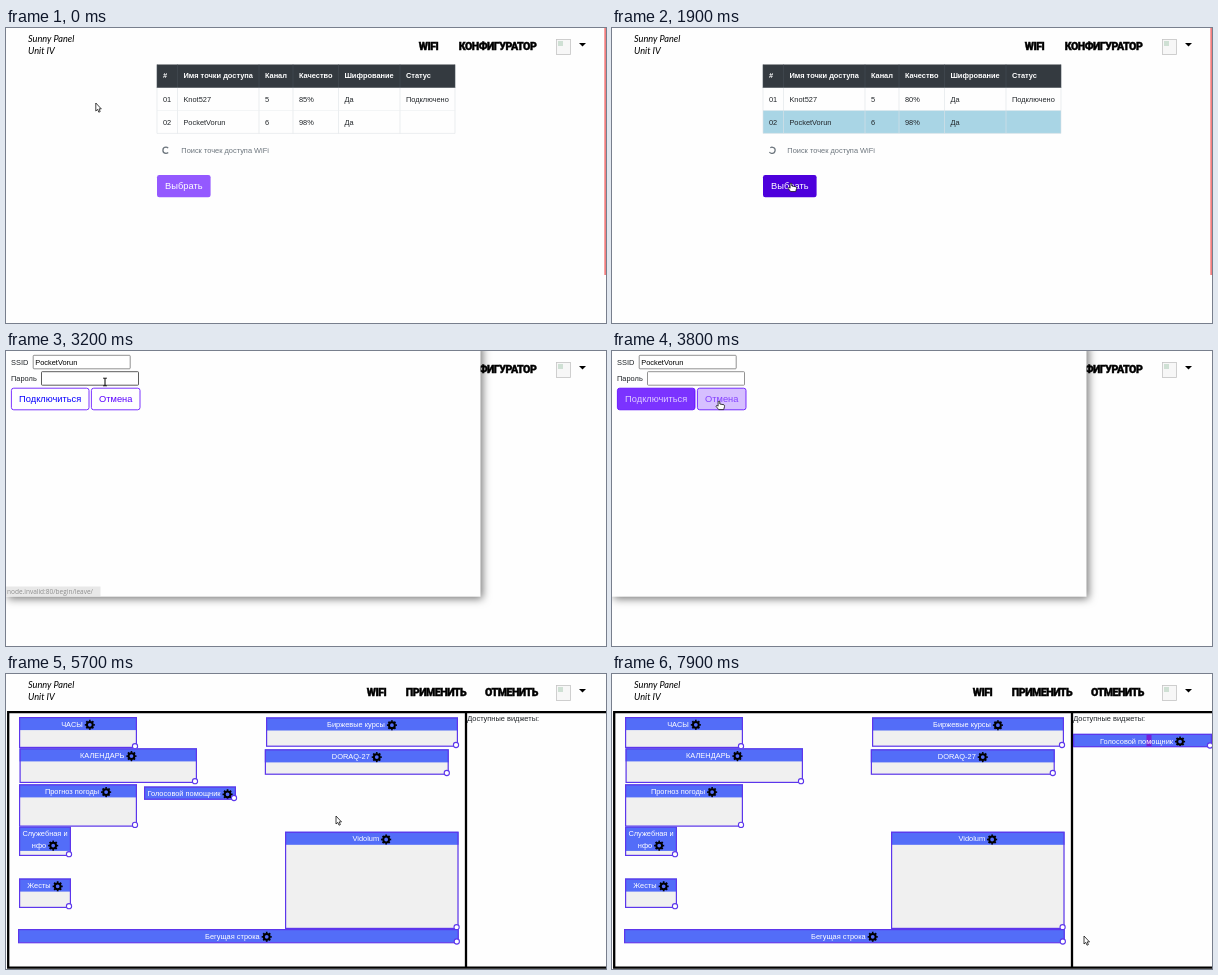
An HTML page that plays this animation: 600x295 px, repeating every 8000 ms.

```html
<!DOCTYPE html>
<html lang="ru">
<head>
<meta charset="utf-8">
<style>
  html, body { margin: 0; width: 100%; height: 100%; overflow: hidden; background: #fefefe; }
  svg { display: block; width: 600px; height: 295px; font: 7.43px "Liberation Sans", Arial, sans-serif; }
  text { fill: #212529; white-space: pre; }
  .logo { font: italic 9.2px Lato, sans-serif; fill: #000; }
  .nav { font: 900 10.6px Roboto, sans-serif; letter-spacing: -.5px; fill: #000; stroke: #000; stroke-width: .4; text-anchor: middle; }
  .nav.lit { fill: #3f8490; stroke: #3f70a0; }
  .head { font-weight: bold; fill: #fff; }
  .btn { font-size: 9.29px; text-anchor: middle; }
  .title { fill: #fff; text-anchor: middle; }
  .status { font: 6.5px "Open Sans", sans-serif; fill: #444; }
  .modal-box { fill: #fefefe; filter: drop-shadow(2px 2px 4px rgba(0,0,0,.55)); }
  .cursor { stroke: #111; stroke-width: .8; stroke-linejoin: round; fill: #fff; }
</style>
</head>
<body>
<svg id="stage" viewBox="0 0 600 295"></svg>
<script>
const LOOP = 8000, STEP = 100;
const PURPLE = '#5b00ff';
const stage = document.getElementById('stage');

function add(parent, tag, attrs = {}, content) {
  const el = document.createElementNS('http://www.w3.org/2000/svg', tag);
  for (const k in attrs) el.setAttribute(k, attrs[k]);
  if (content !== undefined) el.textContent = content;
  parent.append(el);
  return el;
}
const group = (parent, attrs) => add(parent, 'g', attrs);
const rect = (parent, x, y, width, height, fill, more) =>
  add(parent, 'rect', { x, y, width, height, fill, ...more });
const text = (parent, x, y, str, cls = '') => add(parent, 'text', { x, y, class: cls }, str);
const path = (parent, d, more) => add(parent, 'path', { d, ...more });
const show = (el, on) => { el.style.display = on ? '' : 'none'; };
const set = (el, attrs) => { for (const k in attrs) el.setAttribute(k, attrs[k]); };

// Linear interpolation through rows of [time, ...values]
function track(rows, t) {
  let i = 0;
  while (i < rows.length - 1 && rows[i + 1][0] <= t) i++;
  const a = rows[i], b = rows[i + 1] || a;
  const p = b === a ? 0 : (t - a[0]) / (b[0] - a[0]);
  return a.slice(1).map((v, k) => v + (b[k + 1] - v) * p);
}

// Shared top bar
text(stage, 22, 14, 'Sunny Panel', 'logo');
text(stage, 22, 26.3, 'Unit IV', 'logo');
rect(stage, 550.5, 11.5, 14, 15, '#f7f7f7', { stroke: '#c4c4c4', 'stroke-width': .8 });
rect(stage, 552, 13, 5, 5, '#cfe0d4');
path(stage, 'M573 15h7l-3.5 3.6z');

// Wi-Fi page
const wifi = group(stage);
text(wifi, 422.5, 21.7, 'WIFI', 'nav');
const configLink = text(wifi, 491.5, 21.7, 'КОНФИГУРАТОР', 'nav');
const redEdge = rect(wifi, 598.3, 0, 1.7, 247, '#f27e7e');

const COLS = [151, 171.5, 253, 287, 332.5, 394, 449];
const ROWS = [36.5, 60, 82.7, 105.4];
const cells = [
  ['#', 'Имя точки доступа', 'Канал', 'Качество', 'Шифрование', 'Статус'],
  ['01', 'Knot527', '5', '85%', 'Да', 'Подключено'],
  ['02', 'PocketVorun', '6', '98%', 'Да', '']
];
const rowBoxes = [], cellTexts = [];
cells.forEach((row, r) => {
  const y = ROWS[r], h = ROWS[r + 1] - y;
  rowBoxes.push(rect(wifi, 151, y, 298, h, r ? '#fefefe' : '#343a40'));
  COLS.forEach(x => path(wifi, `M${x} ${y}v${h}`, { stroke: r ? '#dee2e6' : '#454d55', 'stroke-width': .6 }));
  path(wifi, `M151 ${y + h}h298`, { stroke: '#dee2e6', 'stroke-width': .6 });
  cellTexts.push(row.map((s, c) => text(wifi, COLS[c] + 5.9, y + 13.8, s, r ? '' : 'head')));
});

const spinner = add(wifi, 'circle', {
  cx: 160, cy: 122.3, r: 3.1, fill: 'none', stroke: '#6c757d', 'stroke-width': 1.3,
  pathLength: 8, 'stroke-dasharray': '6 2', 'stroke-dashoffset': -1
});
text(wifi, 175.3, 125, 'Поиск точек доступа WiFi').style.fill = '#6c757d';
const pick = rect(wifi, 151, 147, 53.6, 22.3, PURPLE, { rx: 2.3 });
text(wifi, 177.8, 161.3, 'Выбрать', 'btn').style.fill = '#fff';

function statusBar(parent, y) {
  const g = group(parent);
  rect(g, 0, y, 94.5, 10, '#dadada');
  text(g, 1, y + 7.4, 'node.invalid:80/begin/leave/', 'status');
  return g;
}
const pageStatus = statusBar(wifi, 285);

// Connection dialog
const modal = group(stage);
rect(modal, 0, -8, 474.5, 253.7, '#fefefe', { class: 'modal-box' });
function field(label, y, x, value) {
  text(modal, 5, y + 9.5, label);
  const box = rect(modal, x, y, 97, 13.5, '#fff', { rx: .8, stroke: '#767676', 'stroke-width': .8 });
  text(modal, x + 2, y + 9.5, value).style.fill = '#000';
  return box;
}
field('SSID', 4.3, 27.2, 'PocketVorun');
const password = field('Пароль', 20.7, 35.5, '');

function outlineButton(x, w, label) {
  const box = rect(modal, x, 37.2, w, 21.6, PURPLE, { rx: 2.3, stroke: PURPLE, 'stroke-width': .8 });
  const caption = text(modal, x + w / 2, 51.2, label, 'btn');
  return level => {
    box.setAttribute('fill-opacity', level);
    const mix = c => Math.round(c + (255 - c) * level);
    caption.style.fill = `rgb(${mix(91)},${mix(0)},255)`;
  };
}
const setConnect = outlineButton(5.4, 77.6, 'Подключиться');
const setCancel = outlineButton(85.4, 48.6, 'Отмена');
const modalStatus = statusBar(modal, 235.5);

// Widget editor
const editor = group(stage);
[[370.5, 'WIFI'], [430, 'ПРИМЕНИТЬ'], [505.5, 'ОТМЕНИТЬ']].forEach(([x, s]) => text(editor, x, 21.7, s, 'nav'));
path(editor, 'M602 38.2H2.2V293.7H602M460 38.2V293.7', { fill: 'none', stroke: '#000', 'stroke-width': 2.3 });
text(editor, 461.2, 46.7, 'Доступные виджеты:');

function gear(parent, x, y) {
  const g = group(parent, { transform: `translate(${x} ${y})`, fill: 'none', stroke: '#000' });
  add(g, 'circle', { r: 2.9, 'stroke-width': 2 });
  add(g, 'circle', { r: 4.2, 'stroke-width': 1.7, pathLength: 16, 'stroke-dasharray': '1 1', 'stroke-dashoffset': .5 });
}

function widget(x, y, w, h, title, mark) {
  const g = group(editor, { transform: `translate(${x} ${y})` });
  const lines = title.split('\n');
  const head = Math.min(h, 1.8 + 11.3 * lines.length);
  rect(g, 0, 0, w, h, '#f0f0f0');
  rect(g, 0, 0, w, head, '#536df8');
  if (mark) rect(g, w / 2 + 4, 1, 5, h - 1.5, '#7620d6');
  lines.forEach((line, i) => {
    const last = i === lines.length - 1;
    const cx = w / 2 - (last ? 6 : 0), by = 9.8 + 11.3 * i;
    const label = text(g, cx, by, line, 'title');
    if (last) gear(g, cx + label.getComputedTextLength() / 2 + 7, by - 2);
  });
  rect(g, .6, .6, w - 1.2, h - 1.2, 'none', { stroke: '#5c36ec', 'stroke-width': 1.2 });
  add(g, 'circle', { cx: w - 2, cy: h - 1.8, r: 2.6, fill: '#fff', stroke: '#5c36ec', 'stroke-width': 1.1 });
  return g;
}
[
  [13, 43, 118, 31, 'ЧАСЫ'],
  [260, 43.4, 192, 29.4, 'Биржевые курсы'],
  [13.5, 74.3, 177.5, 34.7, 'КАЛЕНДАРЬ'],
  [258.8, 75.3, 184, 25.5, 'DORAQ-27'],
  [13, 110.3, 118, 42.4, 'Прогноз погоды'],
  [13, 152.5, 52, 29.5, 'Служебная и\nнфо'],
  [13, 204.5, 52, 29.5, 'Жесты'],
  [279, 157.7, 173.6, 97.3, 'Vidolum'],
  [12, 255, 440.8, 14.3, 'Бегущая строка']
].forEach(w => widget(...w));
const loose = widget(138, 112.5, 92, 13.3, 'Голосовой помощник');
const dragged = widget(138, 112.5, 92, 13.3, 'Голосовой помощник', true);
const docked = widget(461, 59.8, 139, 13.5, 'Голосовой помощник', true);

// Pointers, drawn with the hot spot at 0,0
const cursor = group(stage);
const pointers = {
  arrow: path(cursor, 'M0 0V8L1.8 6.4 3 9.2 4.4 8.6 3.2 5.9H5.5Z', { class: 'cursor' }),
  hand: path(cursor, 'M-.9 .6Q0-.4 .8 .6V3L5 3.8Q5.8 4.2 5.5 5.6L4.7 8.6H-.3L-2.9 5.4Q-2.8 4.3-1.7 4.6L-.9 5.2Z', { class: 'cursor' }),
  grab: path(cursor, 'M-3 3.4Q-2.6 1.6-1 1.9Q0 .5 1.2 1.5Q2.5 .7 3.2 1.9Q4.8 1.8 4.7 3.6L4 8.6H-1.2Z', { class: 'cursor' }),
  beam: path(cursor, 'M-1.8-3.8H-.5Q0-3.8 0-3Q0-3.8 .5-3.8H1.8M0-3V3M-1.8 3.8H-.5Q0 3.8 0 3Q0 3.8 .5 3.8H1.8',
    { fill: 'none', stroke: '#000', 'stroke-width': 1 })
};

const MOVES = [
  [0, 89.8, 75], [100, 89.8, 75], [300, 135, 73], [500, 200, 79], [700, 228, 91], [1100, 222, 95],
  [1400, 200, 112], [1700, 180, 154], [1900, 179, 155], [2200, 179, 155], [2600, 115, 48],
  [2900, 110, 48], [3200, 99, 31], [3400, 68, 46], [3600, 74, 48], [3800, 107, 50], [4100, 107, 50],
  [4500, 480, 24], [4800, 490, 30], [5100, 490, 30], [5400, 395, 158], [5700, 330, 142],
  [6200, 191, 112], [6400, 191, 112], [6600, 370, 110], [6800, 479, 101.5], [7000, 510, 97],
  [7200, 527, 92], [7400, 532, 62], [7800, 472, 262], [8000, 472, 262]
];
const POINTERS = [
  [0, 'arrow'], [1700, 'hand'], [2300, 'arrow'], [2600, 'hand'], [3100, 'beam'], [3400, 'hand'],
  [4200, 'arrow'], [4500, 'hand'], [5200, 'arrow'], [6200, 'grab'], [7500, 'arrow']
];
const CONNECT = [[3300, 0], [3500, 1], [3700, 1], [3800, .8], [4000, 0]];
const CANCEL = [[2500, 0], [2700, 1], [3000, 1], [3200, 0], [3700, 0], [3800, .25], [4000, 1]];

function drawWifi(t, x, y) {
  const picked = t >= 800;
  const free = t < 2300;
  const over = r => free && x > 151 && x < 449 && y >= ROWS[r] && y < ROWS[r + 1];
  set(rowBoxes[1], { fill: over(1) ? '#ececec' : '#fefefe' });
  set(rowBoxes[2], { fill: picked ? '#a9d5e5' : over(2) ? '#ececec' : '#fefefe' });
  cellTexts[1][3].textContent = t < 1200 ? '85%' : '80%';
  set(spinner, { transform: `rotate(${t / 750 * 360} 160 122.3)` });
  set(pick, { fill: !picked ? '#9459ff' : free && y > 147 ? '#4d00dc' : PURPLE });
  configLink.classList.toggle('lit', t >= 4500);
  show(redEdge, free);
  show(pageStatus, t >= 4600);
}

function drawModal(t) {
  setConnect(track(CONNECT, t)[0]);
  setCancel(track(CANCEL, t)[0]);
  set(password, { stroke: t >= 3100 && t < 3400 ? '#333' : '#767676' });
  show(modalStatus, t >= 2600 && t < 3300);
  modalStatus.style.opacity = track([[3100, 1], [3200, .6], [3300, 0]], t)[0];
}

function draw(t) {
  const [x, y] = track(MOVES, t);
  const inEditor = t >= 5100;
  const inModal = t >= 2300 && t < 4200;
  show(wifi, !inEditor);
  show(modal, inModal);
  show(editor, inEditor);
  drawWifi(t, x, y);
  drawModal(t);

  const dropped = t >= 7400;
  const held = t >= 6400 && !dropped;
  show(loose, t < 6400);
  show(dragged, held);
  show(docked, dropped);
  set(dragged, { transform: `translate(${x - 54} ${y + .5})` });

  const kind = POINTERS.filter(p => p[0] <= t).pop()[1];
  for (const k in pointers) show(pointers[k], k === kind);
  set(cursor, { transform: `translate(${x} ${y})` });
}

const start = performance.now();
function tick() {
  const t = (performance.now() - start) % LOOP;
  draw(Math.floor(t / STEP) * STEP);
  requestAnimationFrame(tick);
}
tick();
</script>
</body>
</html>
```
